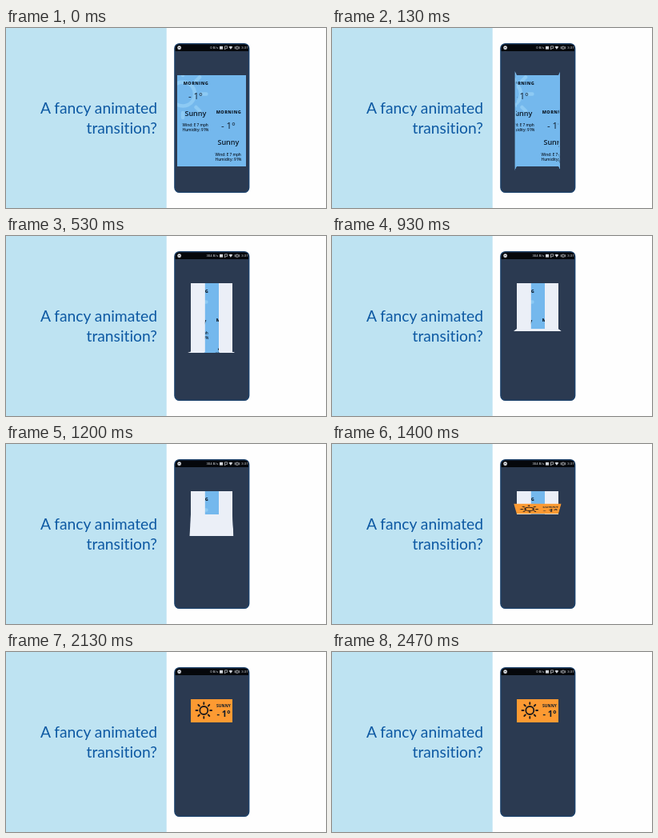
Recreate the animation shown at these times as an HTML page. Size 400 px wide and 225 px high, loop 2.54 s.

```html
<!DOCTYPE html>
<html lang="en">
<head>
<meta charset="utf-8">
<title>Folding weather card</title>
<style>
html, body { margin: 0; width: 100%; height: 100%; overflow: hidden; background: #fefefe; }
#stage { position: absolute; left: 0; top: 0; width: 400px; height: 225px; overflow: hidden; }
#stage > svg, .flap { position: absolute; left: 0; top: 0; width: 400px; height: 225px; }
.panel { position: absolute; display: block; }
.flap { transform-style: preserve-3d; }
.flap .panel { backface-visibility: hidden; }
.title { font: 19.3px Lato, sans-serif; font-variant-ligatures: none; fill: #0d59a3; text-anchor: end; }
.bar { font: 4.3px Roboto, sans-serif; fill: #d4d7dc; }
.card { font-family: "Open Sans", sans-serif; fill: #0e1c2b; text-anchor: middle; }
.x { font-weight: 800; }
.b { font-weight: 700; }
.s { font-weight: 600; }
</style>
</head>
<body>
<div id="stage">
<svg viewBox="0 0 400 225">
  <defs>
    <g id="info" class="card">
      <text class="x" x="237.4" y="70.5" font-size="5.4" letter-spacing=".5">MORNING</text>
      <text x="237" y="89.1" font-size="11.4">- 1°</text>
      <text class="s" x="236.9" y="109.6" font-size="9">Sunny</text>
      <text class="s" x="236.7" y="123" font-size="4.7">Wind: E 7 mph</text>
      <text class="s" x="237" y="129.4" font-size="4.7">Humidity: 91%</text>
    </g>
    <g id="sun" fill="none">
      <circle r="5"/>
      <path d="M7.8 0H9.8M-7.8 0H-9.8M0 7.8V9.8M0-7.8V-9.8M5.5 5.5L7 7M-5.5 5.5L-7 7M5.5-5.5L7-7M-5.5-5.5L-7-7"/>
    </g>
    <clipPath id="edge"><rect x="214" y="59" width="86" height="114"/></clipPath>
    <g id="sheet">
      <rect x="213" y="58" width="88" height="116" fill="#74b8ed"/>
      <g clip-path="url(#edge)">
        <use href="#sun" transform="translate(221 82.5) scale(3)" stroke="#8dcaf4" stroke-width="1.5" stroke-linecap="round"/>
      </g>
      <use href="#info"/>
      <use href="#info" x="41" y="36.8"/>
    </g>
    <g id="folded">
      <use href="#sheet"/>
      <path d="M231 58h17.8v116h-17.8zM266 58h18v116h-18z" fill="#ebeff7"/>
    </g>
    <rect id="blank" x="213" y="58" width="88" height="116" fill="#ebeff7"/>
    <g id="ticket">
      <rect x="230" y="58" width="55" height="31" fill="#fd9a32"/>
      <use href="#sun" transform="translate(247.3 73)" stroke="#1c1a1c" stroke-width="1.8" stroke-linecap="round"/>
      <g class="card b">
        <text x="272" y="68.6" font-size="4.9" letter-spacing=".15">SUNNY</text>
        <text x="272" y="80.6" font-size="10.8">- 1°</text>
      </g>
    </g>
  </defs>
  <rect width="200.7" height="225" fill="#bee3f2"/>
  <text class="title" x="189" y="107.3">A fancy animated</text>
  <text class="title" x="189" y="132.3">transition?</text>
  <rect x="210.9" y="19.6" width="92.8" height="185.8" rx="6" fill="#2b3a51" stroke="#1c426c" stroke-width="1.4"/>
  <path d="M211.6 29V25Q212 20.5 217 20.5H298Q303 20.5 303 25V29z" fill="#05070b"/>
  <circle cx="216.6" cy="24.7" r="2.4" fill="#e4e6ea"/>
  <path d="M215.3 25.3l1.3-1.3 1.3 1.3" fill="none" stroke="#05070b" stroke-width=".7"/>
  <text id="speed" class="bar" x="265.4" y="26.3" text-anchor="end"></text>
  <g fill="#d4d7dc" transform="translate(-.5 0)">
    <path d="M267.5 22.8h4v3.8h-4z"/>
    <path d="M274 22.8h3.2v2.6h-1.6l-1.6 1.4z" fill="none" stroke="#d4d7dc" stroke-width=".7"/>
    <path d="M279 23.6q2.4-1.6 4.8 0l-2.4 3.2z"/>
    <path d="M286.6 23.2v3M288.1 23.2h2.6v3h-2.6zM292.2 23.2v3" fill="none" stroke="#d4d7dc" stroke-width=".7"/>
  </g>
  <text class="bar" x="294.3" y="26.3">3:37</text>
</svg>
</div>
<script>
const LOOP = 2540, FRAME = 1000 / 15;
const FOLD = 405, LEAD = 68, DEPTH = 215;
const X = 231, Y = 59, W = 52, H = 28.5, SIDE = 17;
const stage = document.getElementById('stage');
const speed = document.getElementById('speed');

// A window onto one drawing, placed at its own stage coordinates.
function panel(parent, art, x, y, w, h, artY = y) {
  parent.insertAdjacentHTML('beforeend',
    `<svg class="panel" style="left:${x}px;top:${y}px;width:${w}px;height:${h}px"
      viewBox="${x} ${artY} ${w} ${h}"><use href="#${art}"/></svg>`);
  return parent.lastElementChild;
}

function flap(front, back, x, y, w, h, axis, hinge, artY) {
  const el = document.createElement('div');
  el.className = 'flap';
  stage.append(el);
  panel(el, front, x, y, w, h);
  panel(el, back, x, y, w, h, artY).style.transform = `rotate${axis}(180deg)`;
  const cx = X + W / 2, dx = axis === 'Y' ? hinge - cx : 0;
  el.style.transformOrigin = `${cx}px ${axis === 'Y' ? Y + 2 * H : hinge}px`;
  const sign = dx > 0 ? -1 : 1;
  el.turn = a => {
    el.style.transform = `perspective(${DEPTH}px) translateX(${dx}px) ` +
      `rotate${axis}(${sign * a}deg) translateX(${-dx}px)`;
  };
  return el;
}

function rowFlap(front, back, row) {
  const y = Y + row * H;
  return flap(front, back, X, y, W, H, 'X', y, back === 'ticket' ? Y : y);
}

const bases = [
  panel(stage, 'sheet', X, Y, W, 4 * H),
  panel(stage, 'folded', X, Y, W, 3 * H),
  panel(stage, 'folded', X, Y, W, 2 * H),
  panel(stage, 'folded', X, Y, W, H),
  panel(stage, 'ticket', X, Y, W, H)
];
// The row just covered lies on top before it folds in turn.
const flaps = [
  [flap('sheet', 'blank', X - SIDE, Y, SIDE, 4 * H, 'Y', X),
   flap('sheet', 'blank', X + W, Y, SIDE, 4 * H, 'Y', X + W)],
  [rowFlap('folded', 'blank', 3)],
  [rowFlap('blank', 'blank', 2)],
  [rowFlap('blank', 'ticket', 1)],
  []
];

function draw(now) {
  const step = Math.floor((now % LOOP + 4) / FRAME);
  const t = step * FRAME;
  const pos = step ? (t + LEAD) / FOLD : 0;
  const phase = Math.min(4, Math.floor(pos));
  const angle = (pos - phase) * 180;
  bases.forEach((el, i) => { el.style.display = i === phase ? 'block' : 'none'; });
  flaps.forEach((set, i) => set.forEach(el => {
    el.style.display = i === phase ? 'block' : 'none';
    if (i === phase) el.turn(angle);
  }));
  speed.textContent = t > 390 && t < 1460 ? '304 B/s' : '0 B/s';
}

const start = performance.now();
function tick() {
  draw(performance.now() - start);
  requestAnimationFrame(tick);
}
tick();
</script>
</body>
</html>
```
